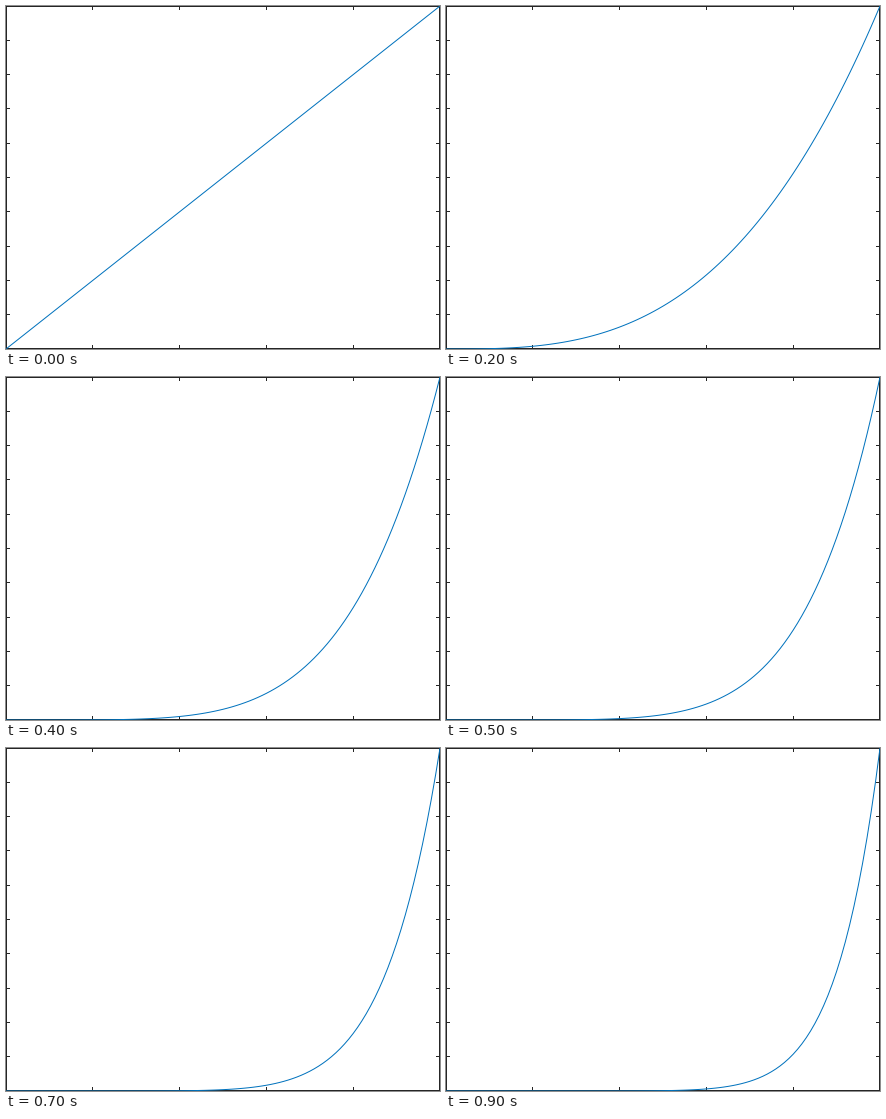
Recreate the animation shown at these times as a matplotlib script. Size 434 px wide and 343 px high, loop 1000 ms.

```python
import numpy as np
import matplotlib.pyplot as plt
from matplotlib.animation import FuncAnimation
from matplotlib.patches import Rectangle

W, H, DPI = 434, 343, 64
PX = 72 / DPI  # one pixel in points
INK = (0.15, 0.15, 0.15)
BLUE = (0, 114 / 255, 189 / 255)
TICK = 4

plt.rcParams["path.simplify"] = False
fig = plt.figure(figsize=(W / DPI, H / DPI), dpi=DPI, facecolor="white")
ax = fig.add_axes([0, 0, 1, 1])
ax.set_xlim(0, W)
ax.set_ylim(H, 0)
ax.axis("off")


def bar(x, y, w, h):
    ax.add_patch(Rectangle((x, y), w, h, facecolor=INK, linewidth=0,
                           antialiased=False))


for y in (0, H - 1):
    bar(0, y, W, 1)
for x in (0, W - 1):
    bar(x, 0, 1, H)
for i in range(1, 5):
    for y in (0, H - TICK):
        bar(i * W // 5, y, 1, TICK)
for i in range(1, 10):
    for x in (0, W - TICK):
        bar(x, i * H // 10, TICK, 1)

t = np.linspace(0, 1, 101)
curve, = ax.plot([], [], color=BLUE, linewidth=PX, snap=False,
                 solid_joinstyle="round", solid_capstyle="butt")


def draw(frame):
    curve.set_data(W * t, H * (1 - t ** (frame + 1)))
    return curve,


anim = FuncAnimation(fig, draw, frames=10, interval=100, repeat=True,
                     repeat_delay=0)
plt.show()
```
